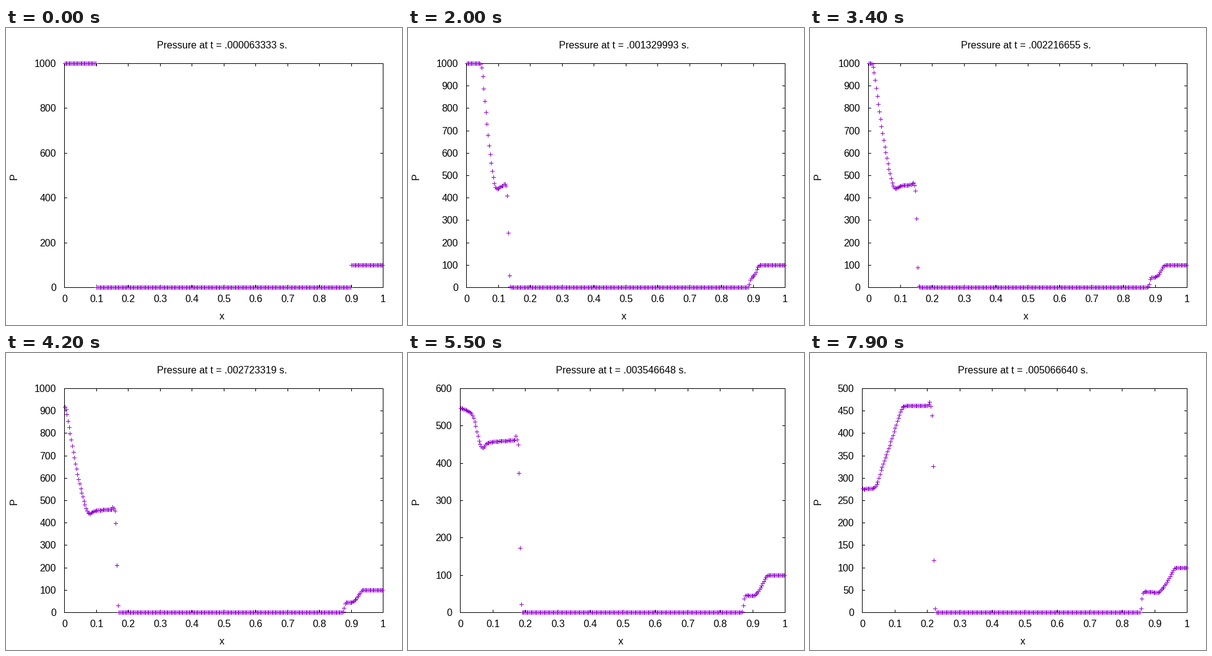
Animation of 640x480 px, one loop 8 s. Source, as a matplotlib script:

```python
import numpy as np
import matplotlib.pyplot as plt
from matplotlib.animation import FuncAnimation

plt.rcParams["font.family"] = "Liberation Sans"
plt.rcParams["path.simplify"] = False

W, H, DPI = 640, 480, 100
PT = 72 / DPI                      # points per pixel
RIGHT, TOP, BOTTOM = 609, 57, 419
PURPLE = "#9400d3"

FRAMES, CELLS = 80, 300
DT = 63.333e-6
C0 = np.sqrt(1400)                 # sound speed of the hot gas at rest
X = (np.arange(CELLS) + 0.5) / CELLS

# Expansion wave: pressure on each characteristic and where it starts.
WAVE_P = np.array([1000, 996, 980, 940, 855, 772, 632, 520, 463, 447, 440.5,
                   440.5, 446, 453, 456, 458, 461])
WAVE_X = 0.1 + np.array([-7, -4.7, -2.8, -1, 0, 1.2, 2.5, 4.8, 7, 9, 13.5,
                         16, 22, 30, 42, 65, 110]) / 1000
WAVE_C = C0 * (WAVE_P / 1000) ** (1 / 7)

# Smeared shock front: distance ahead of the shock and relative pressure.
FRONT_D = np.array([-16, -12.2, -9.2, -6.2, -4.5, -3, -2.2, -1.1, 0, 0.9,
                    1.8, 2.2, 3.6, 4.5, 5.5, 7.5]) / 1000
FRONT_P = [1, 1.024, 1.004, 0.987, 0.945, 0.865, 0.795, 0.67, 0.497, 0.385,
           0.27, 0.2, 0.07, 0.04, 0.011, 0]


def simple_wave(x, t):
    """Sound speed in the expansion before it meets the wall."""
    return np.interp(x, WAVE_X - t * (6 * WAVE_C - 5 * C0), WAVE_C)


def reflected_waves(first):
    """Sound speed per frame from `first` on, with a wall at x = 0."""
    grid = np.linspace(0, 0.35, 3501)
    mirror = np.concatenate((-grid[:0:-1], grid))
    c = simple_wave(grid, (first + 1) * DT)
    u = 5 * (C0 - c)
    rp, rm = u + 5 * c, u - 5 * c
    h = DT / 4

    def foot(speed):
        return grid - h * np.interp(grid - h * speed, grid, speed)

    result = {}
    for k in range(first, FRAMES):
        result[k] = np.interp(X, grid, (rp - rm) / 10)
        for _ in range(4):
            u, c = (rp + rm) / 2, (rp - rm) / 10
            both = np.concatenate((-rm[:0:-1], rp))
            rp = np.interp(foot(u + c), mirror, both)
            rm = np.interp(foot(u - c), grid, rm)
    return result


REFLECTED = reflected_waves(36)


def front(d):
    return np.interp(d, FRONT_D, FRONT_P)


def pressure(k):
    if k == 0:
        return np.where(X < 0.1, 1000.0, np.where(X > 0.9, 100.0, 0.0))
    t = (k + 1) * DT
    c = REFLECTED[k] if k in REFLECTED else simple_wave(X, t)
    left = 1000 * (c / C0) ** 7 * front(X - (0.1006 + 23.52 * t))
    c = simple_wave(1 - X, t * np.sqrt(0.1))
    right = 100 * (c / C0) ** 7 * front(0.9004 - 7.85 * t - X)
    return left + right


fig = plt.figure(figsize=(W / DPI, H / DPI), dpi=DPI, facecolor="white")
ax = fig.add_axes([0, 0, 1, 1])


def pixel(v):
    return np.floor(np.asarray(v) + 0.5)


def segments(x0, y0, x1, y1, color):
    x0, y0, x1, y1 = np.broadcast_arrays(*map(np.atleast_1d, (x0, y0, x1, y1)))
    gap = np.full(x0.shape, np.nan)
    ax.plot(np.column_stack((x0, x1, gap)).ravel(),
            np.column_stack((y0, y1, gap)).ravel(),
            color=color, lw=PT, solid_capstyle="butt", snap=False)


def rows(x, y, n, color="black"):
    segments(x, y + 0.5, x + n, y + 0.5, color)


def columns(x, y, n, color="black"):
    segments(x + 0.5, y, x + 0.5, y + n, color)


def label(x, y, s, ha="center", **kw):
    ax.text(x, y, s, ha=ha, va="baseline", fontsize=16 * PT, color="black", **kw)


def draw(k):
    ax.clear()
    ax.set(xlim=(0, W), ylim=(H, 0))
    ax.axis("off")

    p = pressure(k)
    peak = round(p.max(), 2)
    step = 50 if peak < 500 else 200 if k < 19 else 100
    top = int(np.ceil(peak / step)) * step
    left = 94 if top >= 1000 else 84
    width, height = RIGHT - left, BOTTOM - TOP

    # border and ticks
    rows(left, np.array([TOP, BOTTOM]), width + 1)
    columns(np.array([left, RIGHT]), TOP, height + 1)
    tx = pixel(left + width * np.arange(11) / 10)
    values = np.arange(0, top + 1, step)
    ty = pixel(BOTTOM - height * values / top)
    columns(tx, TOP, 5)
    columns(tx, BOTTOM - 4, 5)
    rows(left, ty, 5)
    rows(RIGHT - 4, ty, 5)

    for i, x in enumerate(tx):
        label(x + 0.5, 443, f"{i / 10:g}")
    for v, y in zip(values, ty):
        label(left - 13, y + 6, str(v), ha="right")
    middle = (left + RIGHT) / 2
    label(middle - 2, 33, f"Pressure at t = .{63333 * (k + 1):09d} s.")
    label(middle - 3, 471, "x")
    label(18, 239.5, "P", rotation=90, rotation_mode="anchor")

    # data crosses
    px = pixel(left + width * X)
    py = pixel(BOTTOM - height * p / top)
    rows(px - 3, py, 7, PURPLE)
    columns(px, py - 3, 7, PURPLE)
    return []


anim = FuncAnimation(fig, draw, frames=FRAMES, interval=100, repeat=True,
                     repeat_delay=0, init_func=lambda: [], blit=False)
plt.show()
```
